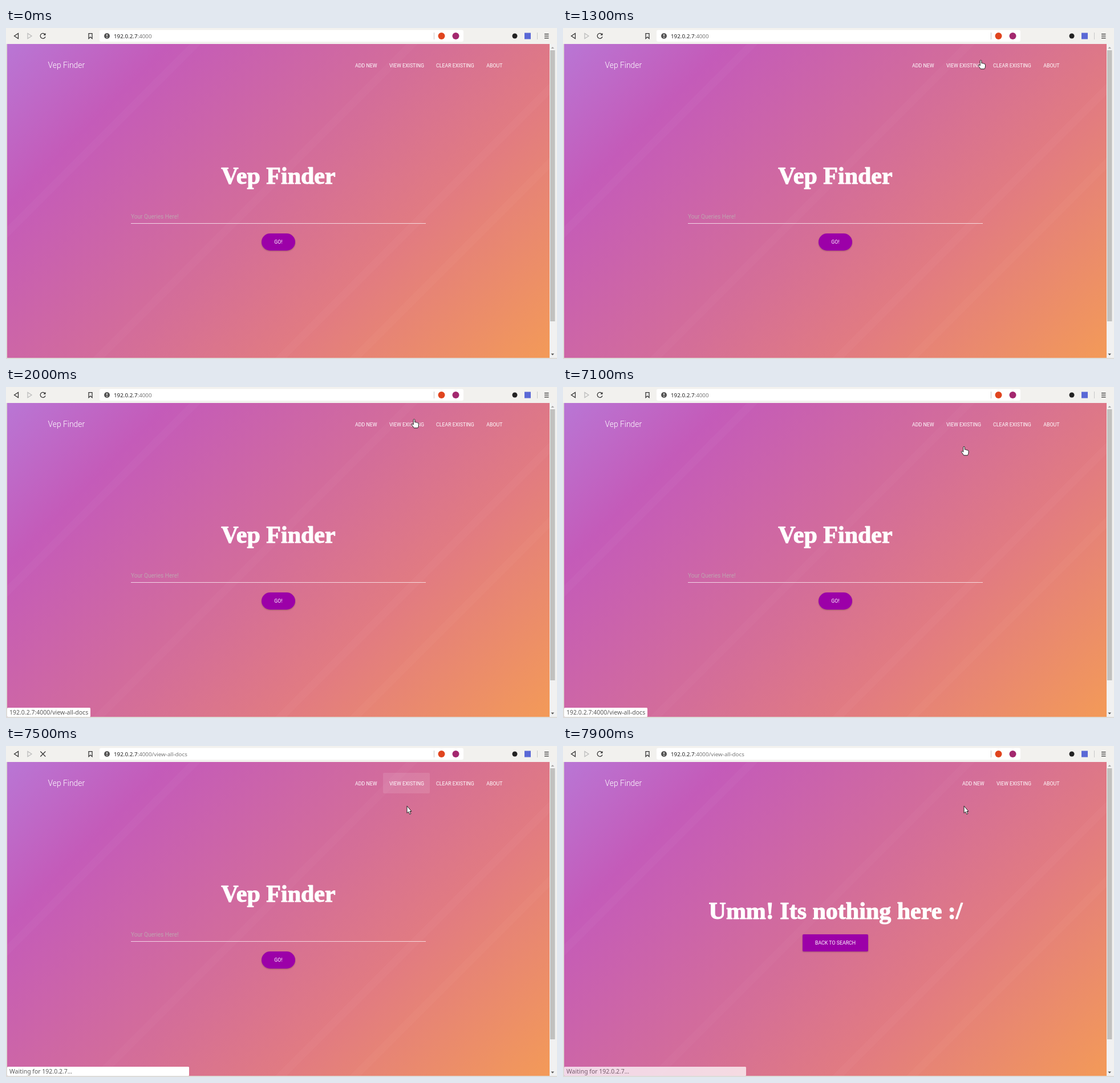
Recreate the animation shown at these times as an HTML page. Size 966x580 px, loop 8000 ms.

```html
<!DOCTYPE html>
<html lang="en">
<head>
<meta charset="utf-8">
<title>Search page</title>
<style>
  html, body { margin: 0; width: 100%; height: 100%; overflow: hidden; background: #f2f1ee; }
  svg { display: block; width: 100vw; height: 100vh; }
  text { white-space: pre; }
  .ui { font-family: "Noto Sans", sans-serif; }
  .url { font-size: 9.8px; fill: #777; }
  .host { fill: #222; }
  .status { font-size: 10.5px; fill: #5a5a5a; }
  .page { font-family: Roboto, sans-serif; font-size: 8.8px; fill: #fff; }
  .brand { font-size: 13.9px; font-weight: 300; }
  .title { font: bold 42px "Liberation Serif", serif; text-anchor: middle; stroke: #fff; stroke-width: 1.1; stroke-linejoin: round; }
  .hint { font-size: 10.1px; fill: #bfa3b0; }
  .label { text-anchor: middle; }
  .button { fill: #9c00a8; filter: drop-shadow(0 1px 1px rgba(0, 0, 0, .25)); }
  .icon { fill: none; stroke: #333; stroke-width: 1.25; }
  .pointer { fill: #fff; stroke: #222; stroke-width: 1; stroke-linejoin: round; }
</style>
</head>
<body>
<svg viewBox="0 0 966 580" preserveAspectRatio="none">
  <defs>
    <linearGradient id="sunset" gradientUnits="userSpaceOnUse" x1="2" y1="28" x2="752" y2="778">
      <stop offset="0" stop-color="#b976d5"/>
      <stop offset=".19" stop-color="#c45bb9"/>
      <stop offset=".5" stop-color="#d46e98"/>
      <stop offset=".7" stop-color="#e27c80"/>
      <stop offset="1" stop-color="#f39a58"/>
    </linearGradient>
    <clipPath id="view"><path d="M2 28H953V578H2Z"/></clipPath>
  </defs>

  <path d="M0 0H966V580H0Z" fill="#f2f1ee"/>
  <path d="M0 28H2V578H966V580H0Z" fill="#dddcd9"/>

  <!-- Toolbar -->
  <rect x="164" y="3.500" width="638" height="20.500" rx="3" fill="#fff"/>
  <g class="icon">
    <path d="M21.500 9.500V18.500L14.500 14Z"/>
    <path d="M38 9.500V18.500L45 14Z" stroke="#bbb"/>
    <g id="reload"><path d="M68.300 11.200A4.500 4.500 0 1 0 69 15.200"/><path d="M69.500 8.800V12.800H65.500Z" fill="#333" stroke="none"/></g>
    <path id="stop" d="M60.300 9.500L69.300 18.500M69.300 9.500L60.300 18.500"/>
    <path d="M145 9.500H151V18.500L148 15.800L145 18.500Z"/>
    <path d="M944 10.500H951.500M944 14H951.500M944 17.500H951.500"/>
    <path d="M750.500 8V20M931.500 8V20" stroke="#c8c8c8" stroke-width="1"/>
  </g>
  <circle cx="177" cy="14" r="5" fill="#555"/>
  <path d="M177 10.800V14.600M177 15.800V17.200" stroke="#fff" stroke-width="1.400"/>
  <circle cx="763.500" cy="14" r="6" fill="#e0451f"/>
  <circle cx="788.500" cy="14" r="6" fill="#a3286f"/>
  <circle cx="892" cy="14" r="4.500" fill="#222"/>
  <rect x="909" y="8.500" width="11" height="11" fill="#5a68d6"/>
  <text class="ui url" x="189" y="17.500"><tspan class="host">192.0.2.7</tspan>:4000<tspan id="path">/view-all-docs</tspan></text>

  <!-- Scrollbar -->
  <path d="M953 28H964V578H953Z" fill="#f1f1f1"/>
  <path d="M954 39H962.500V514H954Z" fill="#c1c1bf"/>
  <path d="M955.500 36L958.200 33L961 36Z" fill="#a3a3a3"/>
  <path d="M955.500 570.500H961L958.200 573.500Z" fill="#505050"/>

  <!-- Page -->
  <g class="page">
    <path d="M2 28H953V578H2Z" fill="url(#sunset)"/>
    <g clip-path="url(#view)" stroke="#fff" stroke-opacity=".025" stroke-width="14">
      <path d="M340 20L-10 370M720 20L150 590M1040 20L470 590M1170 20L600 590"/>
    </g>
    <text class="brand" x="73.500" y="69.500">Vep Finder</text>

    <g id="home">
      <path id="hover" d="M663 47H741Q743 47 743 49V81Q743 83 741 83H663Q661 83 661 81V49Q661 47 663 47Z" fill-opacity=".11"/>
      <text x="612" y="68.600">ADD NEW</text>
      <text x="672" y="68.600">VIEW EXISTING</text>
      <text x="754" y="68.600">CLEAR EXISTING</text>
      <text x="842.300" y="68.600">ABOUT</text>
      <text class="title" x="477.500" y="273">Vep Finder</text>
      <text class="hint" x="219" y="333.500">Your Queries Here!</text>
      <path d="M219 342H736V343H219Z" fill-opacity=".72"/>
      <rect class="button" x="448" y="360" width="59" height="30" rx="15"/>
      <text class="label" x="477.500" y="378.200">GO!</text>
    </g>

    <g id="empty">
      <text x="700" y="68.600">ADD NEW</text>
      <text x="760" y="68.600">VIEW EXISTING</text>
      <text x="842.300" y="68.600">ABOUT</text>
      <text class="title" x="478" y="302.500">Umm! Its nothing here :/</text>
      <rect class="button" x="420" y="330" width="115" height="30" rx="2"/>
      <text class="label" x="477.500" y="348.400">BACK TO SEARCH</text>
    </g>
  </g>

  <g id="bubble">
    <rect id="bubbleBox" x="2" y="562" height="16" rx="1.500" fill="#fff"/>
    <text class="ui status" id="status" x="6" y="573.500"></text>
  </g>

  <g class="pointer" id="pointer">
    <path id="arrow" d="M0 0V12.500L2.700 10.200L4.700 14.600L6.800 13.600L4.900 9.500H8Z"/>
    <path id="hand" d="M-1.300 8V.8Q-1.300 -.6 0 -.6Q1.300 -.6 1.300 .8V4.800Q2.800 4 3.800 5.200Q5.200 4.600 6 5.900Q8 5.600 8 7.400V10Q8 12.500 6.300 14.800H-.3Q-2 12 -4.300 9.300Q-5 7.800 -3.600 7.600Q-2.400 7.600 -1.300 9Z"/>
  </g>
</svg>
<script>
  const LOOP = 8000;
  const byId = id => document.getElementById(id);
  const show = (id, visible) => byId(id).setAttribute("display", visible ? "inline" : "none");

  // Each list holds [start time, value...]; values hold until the next start.
  const pointerSteps = [
    [600, 326, 2, "arrow"], [700, 382, 47, "arrow"],
    [900, 505, 80, "arrow"], [1000, 604, 88, "arrow"],
    [1200, 690, 62, "hand"], [1300, 732.5, 57, "hand"],
    [1600, 727, 57, "hand"], [1700, 720, 57, "hand"], [1800, 715.5, 57, "hand"],
    [7100, 703, 105, "hand"], [7300, 703, 105, "arrow"]
  ];
  const bubbleSteps = [
    [0, 146, 0], [1400, 146, .5], [1600, 146, 1],
    [7400, 234, 1], [7500, 319, 1], [7900, 319, .74]
  ];
  const stepAt = (steps, t) => steps.findLast(step => step[0] <= t);

  function draw(t) {
    const pointer = stepAt(pointerSteps, t);
    show("pointer", pointer);
    if (pointer) {
      const [, x, y, shape] = pointer;
      byId("pointer").setAttribute("transform", `translate(${x} ${y})`);
      show("arrow", shape === "arrow");
      show("hand", shape === "hand");
    }

    const clicked = t >= 7300;
    const loading = clicked && t < 7900;
    show("path", clicked);
    show("stop", loading);
    show("reload", !loading);
    show("hover", t >= 7200);
    show("home", t < 7800);
    show("empty", t >= 7800);

    const [, width, opacity] = stepAt(bubbleSteps, t);
    byId("bubbleBox").setAttribute("width", width);
    byId("bubble").setAttribute("opacity", opacity);
    byId("status").textContent = clicked ? "Waiting for 192.0.2.7…" : "192.0.2.7:4000/view-all-docs";
  }

  const start = performance.now();
  function frame() {
    draw((performance.now() - start) % LOOP);
    requestAnimationFrame(frame);
  }
  frame();
</script>
</body>
</html>
```
